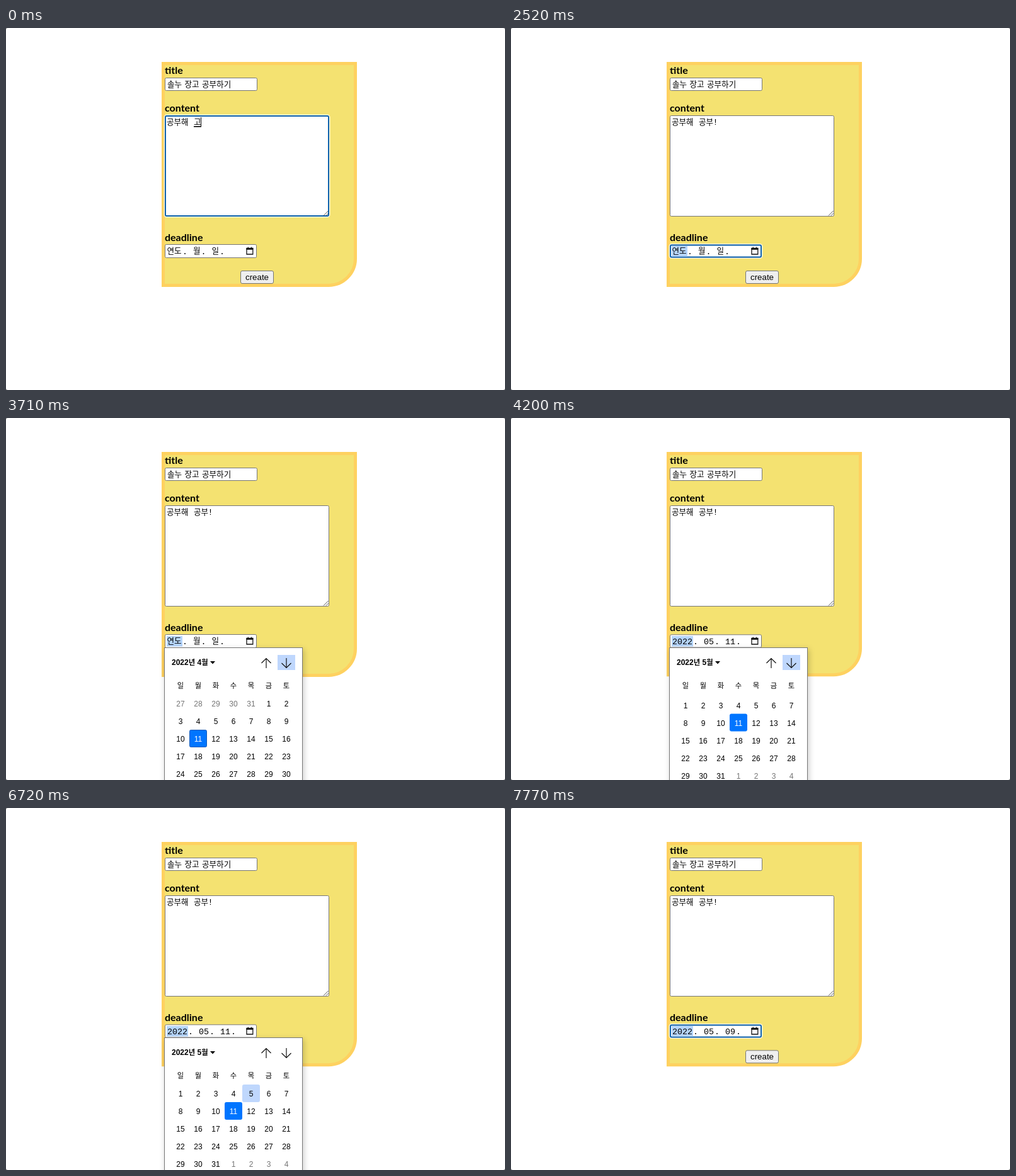
Write an HTML page that moves like this. It is 792 px wide and 576 px high and loops after 8 s.

```html
<!DOCTYPE html>
<html lang="ko">
<head>
<meta charset="utf-8">
<title>Todo form</title>
<style>
  html, body { margin: 0; width: 100%; height: 100%; overflow: hidden; background: #777; }
  svg { display: block; width: 792px; height: 576px; background: #fff; border-radius: 3px; }
  text { white-space: pre; }
  .label { font: bold 16px Lato, sans-serif; }
  .ko { font: 12.55px "Noto Sans CJK KR", "Noto Sans CJK JP", sans-serif; }
  .mono { font: 13.333px "Liberation Mono", monospace; }
  .sans { font: 13.333px "Liberation Sans", sans-serif; }
  .month { font: bold 12px "Liberation Sans", sans-serif; }
  .month .ko, .week { font-size: 11.3px; }
  .month .ko { font-weight: bold; }
  .day { font: 12px "Liberation Sans", sans-serif; }
  .mid { text-anchor: middle; }
  .field { fill: #fff; stroke: #767676; }
  .ring { fill: none; stroke: #0f62ac; stroke-width: 2; }
  .halo { fill: none; stroke: #fff; stroke-opacity: .75; stroke-width: 5; }
  .line { fill: none; stroke: #111; }
  .shade { filter: drop-shadow(2px 3px 5px rgba(0, 0, 0, .2)); }
</style>
</head>
<body>
<svg viewBox="0 0 792 576">
  <defs>
    <clipPath id="view"><rect x="252" y="440" width="218" height="136"/></clipPath>
  </defs>

  <path id="card" fill="#f4e271" stroke="#fed160" stroke-width="5"/>
  <text class="label" x="252" y="73">title</text>
  <text class="label" x="252" y="133">content</text>
  <text class="label" x="252" y="338.5">deadline</text>

  <rect class="field" x="252.5" y="79.5" width="146" height="20" rx="2"/>
  <text class="ko" x="256" y="93.5" word-spacing=".9">솔누 장고 공부하기</text>

  <rect class="field" x="252.5" y="139.5" width="260" height="160" rx="2"/>
  <g id="areaRing">
    <rect class="halo" x="253" y="140" width="259" height="159" rx="2"/>
    <rect class="ring" x="253" y="140" width="259" height="159" rx="2"/>
  </g>
  <path class="line" stroke-opacity=".7" d="M504 298.5l7.5-7.5M508 298.5l3.5-3.5"/>
  <text class="ko" x="255" y="154">공부해</text>
  <text class="ko" id="first" x="298" y="154"></text>
  <text class="ko" id="second" x="309.5" y="154"></text>
  <text class="mono" id="bang" x="320.5" y="154" font-weight="bold">!</text>
  <rect id="underline" y="156" width="12" height="1.6"/>
  <rect id="caret" y="142" width="1" height="15"/>
  <g id="beam" fill="none" stroke-linecap="round">
    <path id="beamPath" stroke="#fff" stroke-width="3.4"
      d="M297 148.5q4.5 0 4.8 3.5q.3-3.5 4.8-3.5M301.8 152v14.500M297 170q4.500 0 4.800-3.500q.3 3.500 4.800 3.500M299.500 159.500h4.600"/>
    <use href="#beamPath" id="beamInk"/>
    <path stroke="#111" stroke-width="1.6"
      d="M297 148.500q4.500 0 4.800 3.500q.3-3.500 4.800-3.500M301.800 152v14.500M297 170q4.500 0 4.800-3.500q.3 3.500 4.800 3.500M299.500 159.500h4.600"/>
  </g>

  <rect class="field" id="date" x="252.5" width="145" rx="2"/>
  <g id="dateRing">
    <rect class="halo" x="253" y="345.5" width="144" height="19" rx="2"/>
    <rect class="ring" x="253" y="345.500" width="144" height="19" rx="2"/>
  </g>
  <rect id="mark" x="255" y="347" height="16.500" fill="#b5d5fd"/>
  <g id="emptyDate">
    <text class="ko" y="359"><tspan x="255.500">연도</tspan><tspan x="297">월</tspan><tspan x="326.500">일</tspan></text>
    <text class="mono" y="359.500" font-weight="bold"><tspan x="280">.</tspan><tspan x="309.500">.</tspan><tspan x="339">.</tspan></text>
  </g>
  <text class="mono" id="fullDate" y="359.500"><tspan x="256">2022</tspan><tspan x="289">.</tspan><tspan x="306">05</tspan><tspan x="323">.</tspan><tspan x="340" id="dayValue">11</tspan><tspan x="357">.</tspan></text>
  <path class="line" stroke-width="1.300" d="M382 350.500h9.800v9.500h-9.800zM384.300 348.500v2M389.500 348.500v2"/>
  <rect x="381.500" y="350" width="10.800" height="2.800" fill="#111"/>

  <g id="button">
    <rect x="372.500" y="386.500" width="52" height="20" rx="2.500" fill="#efefef" stroke="#767676"/>
    <text class="sans mid" x="398.500" y="400.500">create</text>
  </g>

  <g id="picker">
    <rect class="shade" x="251.500" y="365.500" width="219" height="240" fill="#fff" stroke="#767676"/>
    <text class="month" x="263" y="393">2022<tspan class="ko">년</tspan> <tspan id="month"></tspan><tspan class="ko">월</tspan></text>
    <path d="M324 387h8l-4 4.500z"/>
    <rect id="nextHover" x="431" y="377" width="28" height="24" fill="#bfd7fd"/>
    <path class="line" stroke-width="1.200" d="M413 398v-15.500M405.500 390l7.500-7.500l7.500 7.500M445 382v15.500M437.500 390l7.500 7.500l7.500-7.500"/>
    <g id="week"></g>
    <g clip-path="url(#view)"><g id="days"></g></g>
  </g>
</svg>
<script>
const LOOP = 8000, CELL = 28, LEFT = 263, TOP = 440;
const APR_11 = 15, MAY_9 = 43, MAY_11 = 45;
const $ = id => document.getElementById(id);
$('beamInk').remove();

function add(parent, tag, attrs, content = '') {
  const el = document.createElementNS('http://www.w3.org/2000/svg', tag);
  set(el, attrs);
  el.textContent = content;
  return parent.appendChild(el);
}
function set(el, attrs) {
  for (const key in attrs) el.setAttribute(key, attrs[key]);
}
function show(id, on) {
  $(id).style.display = on ? '' : 'none';
}

[...'일월화수목금토'].forEach((name, col) =>
  add($('week'), 'text', { class: 'ko week mid', x: 277 + col * CELL, y: 430 }, name));

// Ten weeks from 27 March 2022; April and May are views of the same strip.
const cells = Array.from({ length: 70 }, (_, i) => {
  const date = new Date(2022, 2, 27 + i);
  const x = LEFT + i % 7 * CELL, y = TOP + Math.floor(i / 7) * CELL;
  return {
    month: date.getMonth() + 1,
    box: add($('days'), 'rect', { x: x + .5, y: y + .5, width: 27, height: 27, rx: 2 }),
    label: add($('days'), 'text', { class: 'day mid', x: x + 14, y: y + 19 }, date.getDate())
  };
});

const initial = {
  first: '고', second: '', bang: false, under: 298, caret: 309, caretOn: true,
  area: true, beam: false, dateHover: false, dateRing: false, mark: false, value: '',
  picker: 0, month: 4, selected: APR_11, focus: true, hover: -1, next: false
};
const april = (col, row) => ({ hover: row * 7 + col });
const may = (col, row = 0) => ({ hover: 35 + row * 7 + col });

const steps = [
  [70, { first: '공' }],
  [490, { second: 'ㅂ', under: 310, caret: 321 }],
  [560, { second: '부' }],
  [1120, { bang: true, under: 0, caret: 328 }],
  [1470, { beam: true }],
  [1540, { beam: false }],
  [1680, { caretOn: false }],
  [1820, { dateHover: true }],
  [2170, { caretOn: true }],
  [2520, { area: false, caretOn: false, dateRing: true, mark: true }],
  [2660, { picker: .5, dateRing: false }],
  [2730, { picker: 1 }],
  [3010, { dateHover: false }],
  [3150, april(3, 0)],
  [3220, april(3, 2)],
  [3430, april(4, 1)],
  [3500, { hover: -1 }],
  [3710, { next: true }],
  [3920, { focus: false }],
  [4060, { month: 5, selected: MAY_11, value: '11' }],
  [4340, { next: false }],
  [4480, may(3)],
  [4620, may(2)],
  [4760, may(1)],
  [5460, may(2)],
  [5530, may(4)],
  [5670, may(5)],
  [6720, may(4)],
  [6790, may(3)],
  [6860, may(2)],
  [6930, may(1)],
  [7280, may(1, 1)],
  [7490, { focus: true }],
  [7630, { selected: MAY_9, value: '09', hover: -1 }],
  [7700, { picker: .5 }],
  [7770, { picker: 0, dateRing: true }]
];

function scrollAt(t) {
  if (t < 4060) return 0;
  const tick = Math.floor(t / 70) * 70;
  const p = Math.min(1, (tick - 4000) / 240);
  const ease = p < .5 ? 4 * p ** 3 : 1 - (2 - 2 * p) ** 3 / 2;
  return ease * 5 * CELL;
}

function drawContent(s) {
  $('first').textContent = s.first;
  $('second').textContent = s.second;
  show('bang', s.bang);
  show('underline', s.under);
  set($('underline'), { x: s.under });
  show('caret', s.caretOn);
  set($('caret'), { x: s.caret });
  show('areaRing', s.area);
  show('beam', s.beam);
}

function drawForm(s) {
  // A numeric date is slightly shorter, which lifts what follows it.
  const lift = s.value ? .7 : 0, bottom = 409.5 - lift;
  set($('card'), { d: `M249.5 56.5H554.5V${bottom - 42.5}a42.5 42.5 0 0 1-42.5 42.5H249.5z` });
  set($('button'), { transform: `translate(0 ${-lift})` });
  set($('date'), { y: 344.5 + lift / 2, height: 21 - lift });
  $('date').style.stroke = s.dateHover ? '#4f4f4f' : '';
  show('dateRing', s.dateRing);
  show('mark', s.mark);
  set($('mark'), { width: s.value ? 34 : 25 });
  show('emptyDate', !s.value);
  show('fullDate', s.value);
  $('dayValue').textContent = s.value;
}

function drawPicker(s, t) {
  show('picker', s.picker);
  set($('picker'), { opacity: s.picker });
  $('month').textContent = s.month;
  show('nextHover', s.next);
  set($('days'), { transform: `translate(0 ${-scrollAt(t)})` });
  cells.forEach(({ month, box, label }, i) => {
    const on = i === s.selected;
    const fill = on ? '#0075ff' : i === s.hover ? '#bfd7fd' : 'none';
    set(box, { fill, stroke: on && s.focus ? '#1259b8' : fill });
    set(label, {
      fill: on ? '#fff' : month === s.month ? '#000' : '#757575',
      'font-weight': on ? 'bold' : 'normal'
    });
  });
}

const start = performance.now();
function frame() {
  const t = (performance.now() - start) % LOOP;
  const s = Object.assign({}, initial, ...steps.filter(([at]) => at <= t).map(([, change]) => change));
  drawContent(s);
  drawForm(s);
  drawPicker(s, t);
  requestAnimationFrame(frame);
}
frame();
</script>
</body>
</html>
```
